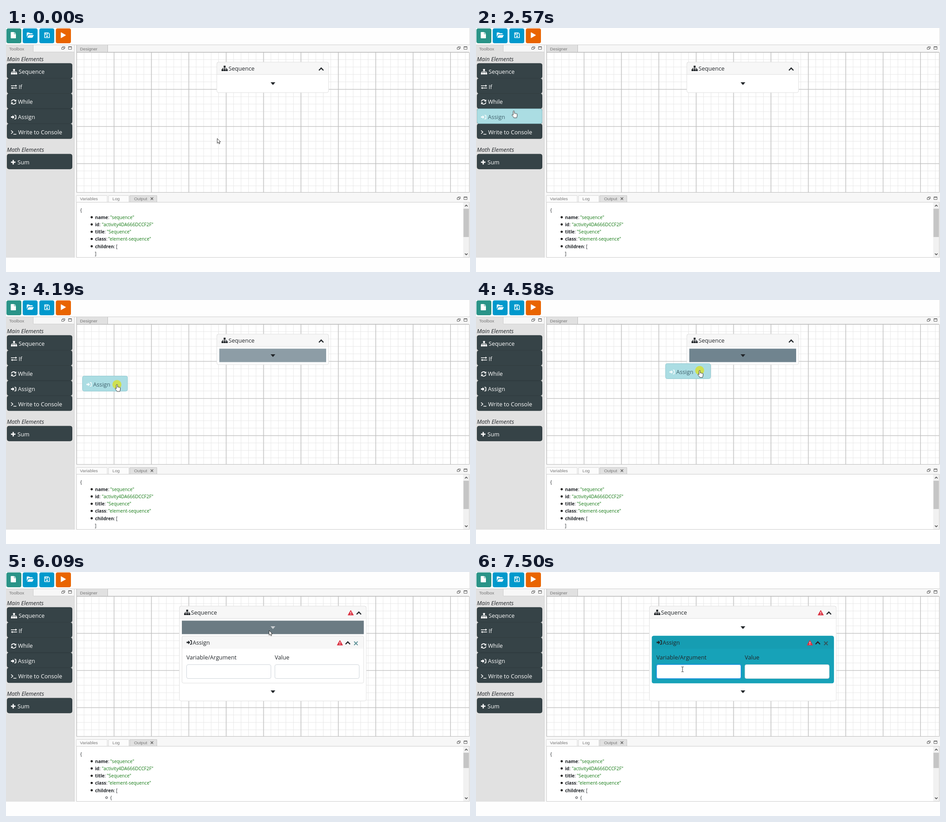
These frames come from a looping animation (1029x544 px, 8000 ms). An HTML page:

```html
<!DOCTYPE html>
<html lang="en">
<head>
<meta charset="utf-8">
<title>Workflow designer</title>
<style>
html, body { margin: 0; width: 100%; height: 100%; overflow: hidden; background: #fff; }
svg { display: block; width: 100%; height: 100%; }
text { font: 12.65px "Open Sans", "Noto Sans", sans-serif; fill: currentColor; white-space: pre; }
.ui { color: #212529; }
.group { font-style: italic; }
.tabs text { font: 9.7px "Liberation Sans", Arial, sans-serif; fill: #777; }
.json text { font-size: 10.2px; }
.json b, .json .key { font-weight: 700; }
.json .val { fill: #157a15; }
.btn { color: #fff; }
.btn rect { fill: #364347; stroke: #2b373b; }
.lit { color: #40616c; }
.lit rect { fill: #abdde3; stroke: #8fc6cf; }
.lit use { color: #f4fbfc; }
.box { fill: #fff; stroke: #dfdfdf; }
.head { fill: #000; fill-opacity: .03; }
.input { fill: #fff; stroke: #ced4da; }

/* 1% of the loop is 80 ms */
.pointer, .helper, .show { animation: 8s infinite step-end; }
.fade { animation: 8s infinite linear; }

.pointer { animation-name: pointer; }
@keyframes pointer {
  0% { transform: translate(468px, 246px); }
  12.125% { transform: translate(468px, 246px); animation-timing-function: steps(3, start); }
  15.2% { transform: translate(450px, 243px); animation-timing-function: steps(4, start); }
  19.15% { transform: translate(340px, 219px); }
  19.25% { transform: translate(340px, 219px); animation-timing-function: steps(2, start); }
  21.125% { transform: translate(260px, 186px); animation-timing-function: steps(2, start); }
  23% { transform: translate(223px, 172px); }
  23.25% { transform: translate(223px, 172px); animation-timing-function: steps(4, start); }
  27.2% { transform: translate(154px, 182px); animation-timing-function: steps(7, start); }
  34.1% { transform: translate(72px, 185px); }
  34.375% { transform: translate(72px, 185px); animation-timing-function: steps(3, start); }
  37.375% { transform: translate(60px, 199.5px); }
  47.625% { transform: translate(60px, 199.5px); animation-timing-function: steps(2, start); }
  49.25% { transform: translate(121px, 204px); }
  49.625% { transform: translate(121px, 204px); animation-timing-function: steps(9, start); }
  58.1% { transform: translate(496px, 157px); }
  58.375% { transform: translate(496px, 157px); animation-timing-function: steps(9, start); }
  67.3% { transform: translate(583px, 130px); }
  77.5% { transform: translate(583px, 130px); animation-timing-function: steps(6, start); }
  82.7% { transform: translate(458px, 211px); }
  82.875% { transform: translate(458px, 211px); animation-timing-function: steps(3, start); }
  85.875%, 100% { transform: translate(458px, 217px); }
}
.helper { animation-name: helper; }
@keyframes helper {
  0% { transform: translate(44px, 183px); visibility: hidden; }
  49.625% { transform: translate(44px, 183px); visibility: visible; animation-timing-function: steps(9, start); }
  58.1% { transform: translate(420px, 141.5px); visibility: visible; }
  58.375% { transform: translate(420px, 141.5px); visibility: visible; animation-timing-function: steps(9, start); }
  67.3% { transform: translate(524.5px, 109.5px); visibility: visible; }
  72.8%, 100% { transform: translate(524.5px, 109.5px); visibility: hidden; }
}

.arrow { animation-name: arrow; }
@keyframes arrow {
  0%, 72.8% { visibility: visible; }
  27.2%, 81.8%, 100% { visibility: hidden; }
}
.hand { animation-name: hand; }
@keyframes hand {
  0%, 72.8%, 100% { visibility: hidden; }
  27.2% { visibility: visible; }
}
.beam { animation-name: beam; }
@keyframes beam {
  0% { visibility: hidden; }
  81.8%, 100% { visibility: visible; }
}
.press { animation-name: press; }
@keyframes press {
  0%, 72.2%, 88.6%, 100% { visibility: hidden; }
  44.7%, 86.8% { visibility: visible; }
}
.hover { animation-name: hover; }
@keyframes hover {
  0%, 49.6%, 100% { visibility: hidden; }
  27.2% { visibility: visible; }
}
.lift { animation-name: lift; }
@keyframes lift {
  0%, 49.6%, 100% { visibility: hidden; }
  48.4% { visibility: visible; }
}
.split { animation-name: split; }
@keyframes split {
  0%, 27.2%, 100% { visibility: hidden; }
  26.2% { visibility: visible; }
}
.before { animation-name: before; }
@keyframes before {
  0% { visibility: visible; }
  72.8%, 100% { visibility: hidden; }
}
.after { animation-name: after; }
@keyframes after {
  0% { visibility: hidden; }
  72.8%, 100% { visibility: visible; }
}
.focus { animation-name: focus; }
@keyframes focus {
  0% { visibility: hidden; }
  87.7%, 100% { visibility: visible; }
}
.caret { animation-name: caret; }
@keyframes caret {
  0%, 93.7%, 100% { visibility: hidden; }
  88.6% { visibility: visible; }
}
.offer { animation-name: offer; }
@keyframes offer {
  0%, 47.625% { fill: #fff; }
  48.5% { fill: #f1f3f5; }
  53.5%, 72.15% { fill: #70848f; }
  72.2%, 100% { fill: #455a64; }
}
.settle { animation-name: settle; }
@keyframes settle {
  0%, 72.8% { fill: #455a64; }
  76.125% { fill: #6b7b83; }
  81.25%, 100% { fill: #fff; }
}
.settle-mark { animation-name: settle-mark; }
@keyframes settle-mark {
  0%, 72.8% { color: #ddd; }
  76.125% { color: #c8cdd0; }
  81.25%, 100% { color: #212529; }
}
.select { animation-name: select; }
@keyframes select {
  0%, 86.4% { fill: #fff; stroke: #dfdfdf; }
  88.6%, 100% { fill: #17a2b8; stroke: #17a2b8; }
}
.close { animation-name: close; }
@keyframes close {
  0%, 86.4% { stroke: #5d9197; }
  88.6%, 100% { stroke: #34555c; }
}
</style>
</head>
<body>
<svg viewBox="0 0 1029 544" preserveAspectRatio="none">
  <defs>
    <pattern id="minor" width="16.58" height="16.56" patternUnits="userSpaceOnUse">
      <path d="M0 .5H17M.5 0V17" fill="none" stroke="#e7e7e7"/>
    </pattern>
    <pattern id="major" width="82.9" height="82.8" patternUnits="userSpaceOnUse">
      <path d="M0 .7H83M.7 0V83" fill="none" stroke="#bdbdbd" stroke-width="1.3"/>
    </pattern>
    <g id="tree" fill="currentColor">
      <path d="M4.7 0h4.2v4H4.7zM0 8h4.2v4H0zM4.7 8h4.2v4H4.7zM9.4 8h4.2v4H9.4z"/>
      <path d="M6.8 3v6M2.1 9V6h9.4v3" fill="none" stroke="currentColor" stroke-width="1.2"/>
    </g>
    <path id="swap" fill="currentColor" d="M0 1.7h10V0l3.5 2.5L10 5V3.3H0zM13.5 6.7h-10V5L0 7.5 3.5 10V8.3h10z"/>
    <g id="cycle" fill="currentColor">
      <path d="M1 5a5 5 0 0 1 8.8-2M11 7a5 5 0 0 1-8.8 2" fill="none" stroke="currentColor" stroke-width="1.8"/>
      <path d="M11.7 .4v4.7H7zM.3 11.6V6.9H5z"/>
    </g>
    <g id="enter" fill="currentColor">
      <path d="M0 3.5h3.5V.8L8 5 3.5 9.2V6.5H0z"/>
      <path d="M7.6 .9h2.2a1.2 1.2 0 0 1 1.2 1.2v5.8a1.2 1.2 0 0 1-1.2 1.2H7.6" fill="none" stroke="currentColor" stroke-width="1.7"/>
    </g>
    <path id="prompt" d="M.3 .8l4 3.6-4 3.6M5.5 9H12" fill="none" stroke="currentColor" stroke-width="1.5"/>
    <path id="plus" d="M0 5h10M5 0v10" stroke="currentColor" stroke-width="2.7"/>
    <path id="up" d="M1 8l5-5.2L11 8" fill="none" stroke="currentColor" stroke-width="2.4"/>
    <path id="down" d="M-5.2 0H5.2L.6 5.4a.8 .8 0 0 1-1.2 0z" fill="currentColor"/>
    <g id="alert">
      <path d="M6.5 .8L12.6 11.6H.4z" fill="#dc3545" stroke="#dc3545" stroke-linejoin="round"/>
      <path d="M6.5 4.2v3.5M6.5 9v1.6" stroke="#fff" stroke-width="1.5"/>
    </g>
    <g id="panel" fill="none" stroke="#666">
      <path d="M2.5 2.5v-2h5v4h-2M.5 2.5h5v4h-5z"/>
      <path d="M15.5 .5h7v6h-7zM15.5 1.5h7"/>
    </g>
    <rect id="tile" x=".5" y=".5" width="144" height="33" rx="4"/>
    <clipPath id="outClip"><rect x="157" y="389" width="857" height="122"/></clipPath>
  </defs>

  <rect width="1029" height="544" fill="#fefefe"/>
  <path d="M1028.5 0V37" stroke="#ddd"/>

  <g fill="#fff">
    <rect x="1" y="1" width="33" height="33" rx="4" fill="#2a9488"/>
    <rect x="37" y="1" width="33" height="33" rx="4" fill="#0099cc"/>
    <rect x="74" y="1" width="33" height="33" rx="4" fill="#0099cc"/>
    <rect x="110.5" y="1" width="33.5" height="33" rx="4" fill="#e96400"/>
    <path d="M11.5 9h6.3v4.4H22V22a1 1 0 0 1-1 1h-9.5a1 1 0 0 1-1-1V10a1 1 0 0 1 1-1zM18.6 9l3.4 3.5h-3.4z"/>
    <path d="M46 20.2V11.3a1.2 1.2 0 0 1 1.2-1.2h4l1.6 1.6h5a1.2 1.2 0 0 1 1.2 1.2v1H50.3a2 2 0 0 0-1.7 1zM47 21.8l2.7-5.3a1.4 1.4 0 0 1 1.2-.8h10.8l-2.8 5.4a1.4 1.4 0 0 1-1.2.7z"/>
    <path d="M85.7 10.7h8l2.6 2.6v8.2H85.7z" fill="none" stroke="#fff" stroke-width="1.5" stroke-linejoin="round"/>
    <path d="M87 11h5.5v4H87z"/><path d="M88 11.7h3v1.9h-3z" fill="#0099cc"/>
    <circle cx="91" cy="18.4" r="1.8"/>
    <path d="M121.5 10.2v11.6a.6 .6 0 0 0 .9.5l10-5.8a.6 .6 0 0 0 0-1l-10-5.8a.6 .6 0 0 0-.9.5z"/>
  </g>

  <!-- docked panels -->
  <rect y="37" width="1029" height="475" fill="#f7f7f7"/>
  <path d="M0 37.5H1029" stroke="#cfcfcf"/>
  <path d="M0 54H151V512H0zM0 38H60V55H0zM157 38H225V54H157z" fill="#e1e1e1"/>
  <path d="M60.5 38V53.5H151" fill="none" stroke="#cfcfcf"/>
  <path d="M151.5 38V512" stroke="#d2d2d2"/>
  <rect class="show split" x="151" y="37" width="5" height="475" fill="#bbb"/>
  <path d="M157 54H1028V366H157z" fill="#fff"/>
  <g transform="translate(156 53.3)">
    <rect width="871" height="313" fill="url(#minor)"/>
    <rect width="871" height="313" fill="url(#major)"/>
  </g>
  <path d="M156.5 38V366.5H1027.5V54.5H156.5M225.5 38V54" fill="none" stroke="#bcbcbc"/>
  <path d="M156 388.5V373.5H224.5V388M227.5 388V373.5H272.5V388" fill="#fcfcfc" stroke="#d6d6d6"/>
  <path d="M274.5 389V373.5H334.5V389" fill="#e1e1e1" stroke="#c6c6c6"/>
  <rect x="156.5" y="388.5" width="871" height="123" fill="#fff" stroke="#ccc"/>
  <g class="tabs">
    <text x="7" y="50">Toolbox</text>
    <text x="164" y="50">Designer</text>
    <text x="164" y="384">Variables</text>
    <text x="236" y="384">Log</text>
    <text x="284" y="384">Output</text>
  </g>
  <path d="M320.8 377.8l5.6 5.6m0-5.6l-5.6 5.6" stroke="#555" stroke-width="1.3"/>
  <use href="#panel" x="123" y="41"/>
  <use href="#panel" x="1000" y="41"/>
  <use href="#panel" x="1000" y="376"/>

  <!-- toolbox -->
  <g class="ui">
    <text class="group" x="2" y="74">Main Elements</text>
    <text class="group" x="2" y="276">Math Elements</text>
    <path class="show lift" d="M100 182h48a4 4 0 0 1 4 4v26a4 4 0 0 1-4 4h-48z" fill="#364347"/>
    <g class="btn" transform="translate(2 78.5)"><use href="#tile"/><rect x=".5" y=".5" width="144" height="33" rx="4"/><use href="#tree" x="9" y="13"/><text x="26" y="23.5">Sequence</text></g>
    <g class="btn" transform="translate(2 112.2)"><rect x=".5" y=".5" width="144" height="33" rx="4"/><use href="#swap" x="9" y="14"/><text x="26" y="23.5">If</text></g>
    <g class="btn" transform="translate(2 145.9)"><rect x=".5" y=".5" width="144" height="33" rx="4"/><use href="#cycle" x="9" y="13"/><text x="24.5" y="23.5">While</text></g>
    <g class="btn" transform="translate(2 179.6)"><rect x=".5" y=".5" width="144" height="33" rx="4"/><use href="#enter" x="9" y="14"/><text x="24.5" y="23.5">Assign</text></g>
    <g class="btn" transform="translate(2 213.2)"><rect x=".5" y=".5" width="144" height="33" rx="4"/><use href="#prompt" x="9" y="14.5"/><text x="25" y="23.5">Write to Console</text></g>
    <g class="btn" transform="translate(2 280.7)"><rect x=".5" y=".5" width="144" height="33" rx="4"/><use href="#plus" x="9" y="13.5"/><text x="23.5" y="23.5">Sum</text></g>
    <g class="btn lit show hover" transform="translate(2 179.6)"><rect x=".5" y=".5" width="144" height="33" rx="4"/><use href="#enter" x="9" y="14"/><text x="24.5" y="23.5">Assign</text></g>
  </g>

  <!-- empty sequence -->
  <g class="ui show before">
    <rect class="box" x="467.5" y="76" width="248" height="68" rx="4"/>
    <rect class="head" x="468" y="76.5" width="247" height="26.5"/>
    <path d="M468 103.5H715" stroke="#dfdfdf"/>
    <use href="#tree" x="478" y="84"/>
    <text x="493.5" y="95">Sequence</text>
    <use href="#up" x="693" y="86.5"/>
    <rect class="fade offer" x="473" y="108.5" width="237" height="30"/>
    <use href="#down" x="592" y="121"/>
  </g>

  <!-- sequence with the dropped step -->
  <g class="ui show after">
    <rect class="box" x="384.5" y="76" width="414.5" height="211.5" rx="4"/>
    <rect class="head" x="385" y="76.5" width="413.5" height="26.5"/>
    <path d="M385 103.5H798.5" stroke="#dfdfdf"/>
    <use href="#tree" x="395" y="84"/>
    <text x="410.3" y="95">Sequence</text>
    <use href="#alert" x="758" y="84.5"/>
    <use href="#up" x="776.5" y="86.5"/>
    <rect class="fade settle" x="390" y="108.5" width="403.5" height="30"/>
    <g class="fade settle-mark"><use href="#down" x="592" y="121"/></g>
    <use href="#down" x="592" y="264"/>

    <rect class="box fade select" x="390.3" y="142.7" width="403" height="105" rx="3.5"/>
    <path class="head" d="M390.5 143H793V171H390.5z"/>
    <use href="#enter" x="400.5" y="152"/>
    <text x="414" y="162">Assign</text>
    <use href="#alert" x="734" y="151.5"/>
    <use href="#up" x="752" y="153"/>
    <path class="fade close" d="M772 155l8 8m0-8l-8 8" stroke-width="1.8"/>
    <text x="400" y="195">Variable/Argument</text>
    <text x="596" y="195">Value</text>
    <rect class="input" x="400.5" y="206.5" width="187" height="31" rx="3.5"/>
    <rect class="input" x="596.3" y="206.5" width="187" height="31" rx="3.5"/>
    <g class="show focus" fill="none">
      <rect x="399.5" y="205.5" width="189" height="33" rx="4" stroke="#007bff" stroke-opacity=".25" stroke-width="2"/>
      <rect x="400.5" y="206.5" width="187" height="31" rx="3.5" stroke="#2b95e3"/>
    </g>
    <path class="show caret" d="M411.5 213V231" stroke="#000"/>
  </g>

  <!-- output -->
  <g class="ui json" clip-path="url(#outClip)">
    <text x="164.5" y="410">{</text>
    <g>
      <circle cx="190" cy="422" r="2.4"/><circle cx="190" cy="438" r="2.4"/><circle cx="190" cy="454.3" r="2.4"/>
      <circle cx="190" cy="470.3" r="2.4"/><circle cx="190" cy="486.7" r="2.4"/>
    </g>
    <text x="197.5" y="425.5"><tspan class="key">name</tspan>: <tspan class="val" x="231">"sequence"</tspan></text>
    <text x="197.5" y="441.5"><tspan class="key">id</tspan>: <tspan class="val" x="212.5">"activity4DA666DCCF2F"</tspan></text>
    <text x="197.5" y="458"><tspan class="key">title</tspan>: <tspan class="val" x="223.5">"Sequence"</tspan></text>
    <text x="197.5" y="474"><tspan class="key">class</tspan>: <tspan class="val" x="226.5">"element-sequence"</tspan></text>
    <text x="197.5" y="490.5"><tspan class="key">children</tspan>: <tspan x="244">[</tspan></text>
    <text class="show before" x="197" y="507">]</text>
    <g class="show after">
      <circle cx="223" cy="503" r="2.2" fill="none" stroke="#212529"/>
      <text x="231" y="507">{</text>
    </g>
  </g>
  <rect x="1014" y="389" width="13" height="122" fill="#f1f1f1"/>
  <rect class="show before" x="1014.5" y="403" width="12" height="63" fill="#c5c5c5"/>
  <rect class="show after" x="1014.5" y="403" width="12" height="34" fill="#c5c5c5"/>
  <path d="M1017.8 397.7l2.9-2.9 2.9 2.9M1017.8 502.8l2.9 2.9 2.9-2.9" fill="none" stroke="#444" stroke-width="1.6"/>

  <g class="btn lit helper">
    <rect x=".3" y=".3" width="100" height="33.7" rx="4"/>
    <use href="#enter" x="9" y="14"/>
    <text x="24" y="23.5">Assign</text>
  </g>

  <g class="pointer">
    <circle class="show press" r="10" fill="#d9e021" fill-opacity=".75"/>
    <path class="show arrow" d="M.4 .3V11l2.5-2.3 1.7 3.7 1.7-.8L4.6 8H7.9z" fill="#fff" stroke="#222" stroke-width=".9"/>
    <path class="show hand" d="M-1.3 9.5V1.4a1.3 1.3 0 0 1 2.6 0V6a1.2 1.2 0 0 1 2.2.4 1.2 1.2 0 0 1 2.1.5 1.1 1.1 0 0 1 2 .8V11c0 2-1.2 2.8-1.2 4.6H.2c-.6-2.2-2.9-3.6-4-5.8-.5-1.2 1-2 1.8-1.2z" fill="#fff" stroke="#222" stroke-width=".9"/>
    <path class="show beam" d="M-2.5-5.5h2l.5.5.5-.5h2M0-5V5M-2.5 5.5h2L0 5l.5.5h2" fill="none" stroke="#333"/>
  </g>
</svg>
</body>
</html>
```
